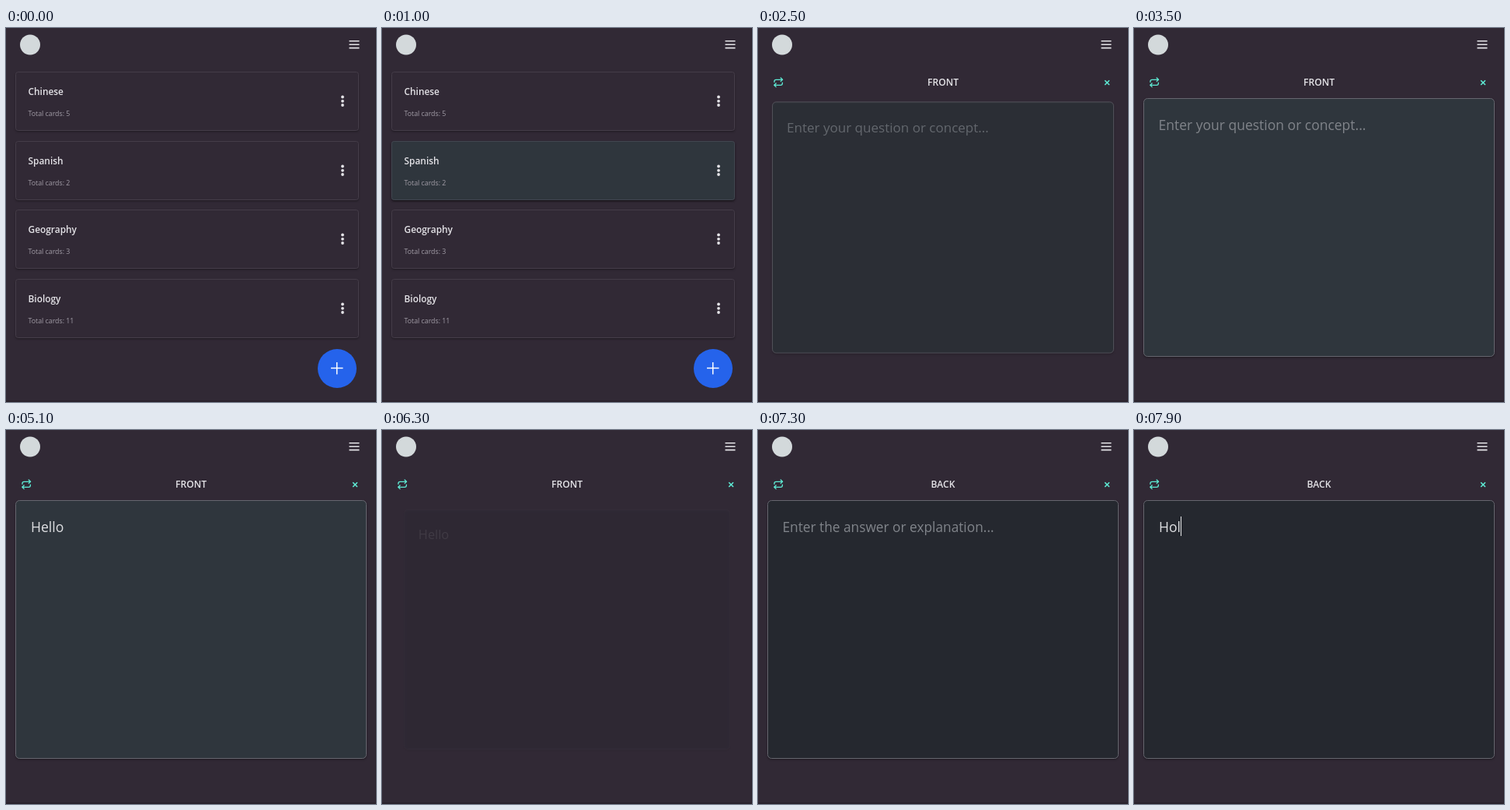
These frames come from a looping animation (476 px wide and 480 px high, 8000 ms). An HTML page with a canvas:

```html
<!DOCTYPE html>
<html lang="en">
<head>
<meta charset="utf-8">
<title>Flashcards</title>
<style>
html, body { margin: 0; width: 100%; height: 100%; overflow: hidden; background: #312935; }
canvas { display: block; width: 476px; height: 480px; }
</style>
</head>
<body>
<canvas id="stage"></canvas>
<script>
const W = 476, H = 480, LOOP = 8000, STEP = 100;
const FONT = '"Open Sans", "Noto Sans", sans-serif';
const BG = '#312935', LIGHT = '#e4e3e7', MINT = '#5eead4';

const canvas = document.getElementById('stage');
const ctx = canvas.getContext('2d');
const dpr = window.devicePixelRatio || 1;
canvas.width = W * dpr;
canvas.height = H * dpr;

const decks = [['Chinese', 5], ['Spanish', 2], ['Geography', 3], ['Biology', 11]];
const questions = ['How are you?', 'See you later!'];
const front = { label: 'FRONT', fill: '#2f363d', hint: 'Enter your question or concept...', size: 17.5 };
const back = { label: 'BACK', fill: '#25282f', hint: 'Enter the answer or explanation...', size: 17.3 };

// [time, typed text]
const frontTyping = [[3800, 'H'], [4000, 'He'], [4300, 'Hel'], [4400, 'Hell'], [4600, 'Hello']];
const backTyping = [[7500, 'H'], [7700, 'Ho'], [7900, 'Hol']];
// [on, off]
const caretSpans = [[2900, 3500], [3800, 5100], [5700, 6000], [6800, 7300], [7500, 8000]];

const clamp = v => Math.max(0, Math.min(1, v));

function text(str, x, y, size, color, weight = 400, align = 'left') {
  ctx.font = `${weight} ${size}px ${FONT}`;
  ctx.textAlign = align;
  ctx.fillStyle = color;
  ctx.fillText(str, x, y);
}

function disc(x, y, r, color) {
  ctx.beginPath();
  ctx.arc(x, y, r, 0, Math.PI * 2);
  ctx.fillStyle = color;
  ctx.fill();
}

function stroke(d, color, width) {
  ctx.strokeStyle = color;
  ctx.lineWidth = width;
  ctx.stroke(new Path2D(d));
}

function fill(d, color) {
  ctx.fillStyle = color;
  ctx.fill(new Path2D(d));
}

function panel(x, y, w, h, r, color, border) {
  ctx.beginPath();
  ctx.roundRect(x + 0.5, y + 0.5, w - 1, h - 1, r);
  ctx.save();
  ctx.shadowColor = 'rgba(0,0,0,.4)';
  ctx.shadowBlur = 3 * dpr;
  ctx.shadowOffsetY = 1.5 * dpr;
  ctx.fillStyle = color;
  ctx.fill();
  ctx.restore();
  ctx.strokeStyle = border;
  ctx.lineWidth = 1;
  ctx.stroke();
}

function header() {
  disc(31, 21.5, 13, '#d3d9db');
  stroke('M441.5 16.8H454.5M441.5 21.2H454.5M441.5 25.6H454.5', LIGHT, 1.6);
}

function plusButton(hover) {
  disc(426, 437, hover ? 26.2 : 25, hover ? '#3b72ee' : '#2563eb');
  stroke('M418 436.5H433.5M425.7 429V444.5', '#fff', 1.5);
}

function deckList(t) {
  decks.forEach(([name, count], i) => {
    const y = 56 + Math.round(i * 88.5);
    panel(12, y, 442, 76, 3, BG, '#453d49');
    if (name === 'Spanish') {
      ctx.save();
      ctx.globalAlpha = clamp((t - 700) / 300);
      panel(12, y, 442, 76, 3, '#2f363d', '#414650');
      ctx.restore();
    }
    text(name, 28.5, y + 30, 11.9, LIGHT, 600);
    text('Total cards: ' + count, 28.5, y + 57, 8.8, '#a29da7');
    for (const dy of [32.5, 37.8, 43]) disc(433, y + dy, 1.9, LIGHT);
  });
  plusButton(false);
}

function trash(x, y) {
  ctx.beginPath();
  ctx.roundRect(x - 3.8, y - 4.2, 7.6, 10, 1.5);
  ctx.fillStyle = '#e80c0c';
  ctx.fill();
  ctx.strokeStyle = '#5a1420';
  ctx.lineWidth = 0.7;
  ctx.stroke();
  fill(`M${x - 4.6} ${y - 4.4}h2.6l.8 -1.2h2.4l.8 1.2h2.6v1.4h-9.2z`, '#e80c0c');
}

function questionList(t) {
  questions.forEach((q, i) => {
    const y = 56 + i * 60;
    panel(12, y, 442, 48, 3, BG, '#453d49');
    text(q, 25, y + 28, 12, '#dddbe0');
    trash(430.7, y + 23.5);
  });
  disc(50, 437, 25, '#16a34a');
  fill('M41 436.2L50 430.8L59 436.2L50 441.6Z', '#fff');
  fill('M44.2 439.3L50 442.8L55.8 439.3V442.3L50 445.3L44.2 442.3Z', '#fff');
  stroke('M58.4 436.5V442.5', '#fff', 1.3);
  plusButton(t >= 2300);
}

function toolbar(label) {
  ctx.lineCap = ctx.lineJoin = 'round';
  stroke('M29.2 64L31.6 66.3L29.2 68.6M31.4 66.3H23.2Q21 66.3 21 68.5V69.4', MINT, 1.3);
  stroke('M23.2 71L20.8 73.3L23.2 75.6M21 73.3H29.2Q31.4 73.3 31.4 71.1V70.2', MINT, 1.3);
  ctx.lineCap = 'butt';
  stroke('M446.2 67.2L452 73M452 67.2L446.2 73', MINT, 1.6);
  text(label, 238, 74, 12.1, LIGHT, 600, 'center');
}

function editor(side, typed, caret, shown) {
  toolbar(side.label);
  if (shown <= 0) return;
  const scale = 0.92 + 0.08 * shown;
  ctx.save();
  ctx.globalAlpha = shown;
  ctx.translate(238, 256);
  ctx.scale(scale, scale);
  ctx.translate(-238, -256);
  panel(12, 90, 452, 332, 5, side.fill, '#66666f');
  if (typed) text(typed, 32, 131, 17.6, '#dedfe2');
  else text(side.hint, 31.5, 131, side.size, '#80848a');
  if (caret) {
    ctx.font = `400 17.6px ${FONT}`;
    const x = 32 + Math.round(ctx.measureText(typed).width);
    ctx.fillStyle = '#e8e8ea';
    ctx.fillRect(x, 111, 1, 25);
  }
  ctx.restore();
}

function typedAt(steps, t) {
  return steps.reduce((s, [at, str]) => t >= at ? str : s, '');
}

function draw(t) {
  ctx.setTransform(dpr, 0, 0, dpr, 0, 0);
  ctx.fillStyle = BG;
  ctx.fillRect(0, 0, W, H);
  ctx.fillStyle = '#29222c';
  ctx.fillRect(475, 0, 1, H);
  ctx.fillRect(0, 478, W, 2);
  header();
  const caret = caretSpans.some(([on, off]) => t >= on && t < off);
  if (t < 1500) deckList(t);
  else if (t < 2400) questionList(t);
  else if (t < 6400) {
    const shown = Math.min(clamp((t - 2300) / 300), clamp((6300 - t) / 400 + 0.1));
    editor(front, typedAt(frontTyping, t), caret, shown);
  } else editor(back, typedAt(backTyping, t), caret, clamp((t - 6400) / 300));
}

const start = performance.now();
function tick() {
  const t = (performance.now() - start) % LOOP;
  draw(Math.floor(t / STEP) * STEP);
  requestAnimationFrame(tick);
}
tick();
</script>
</body>
</html>
```
